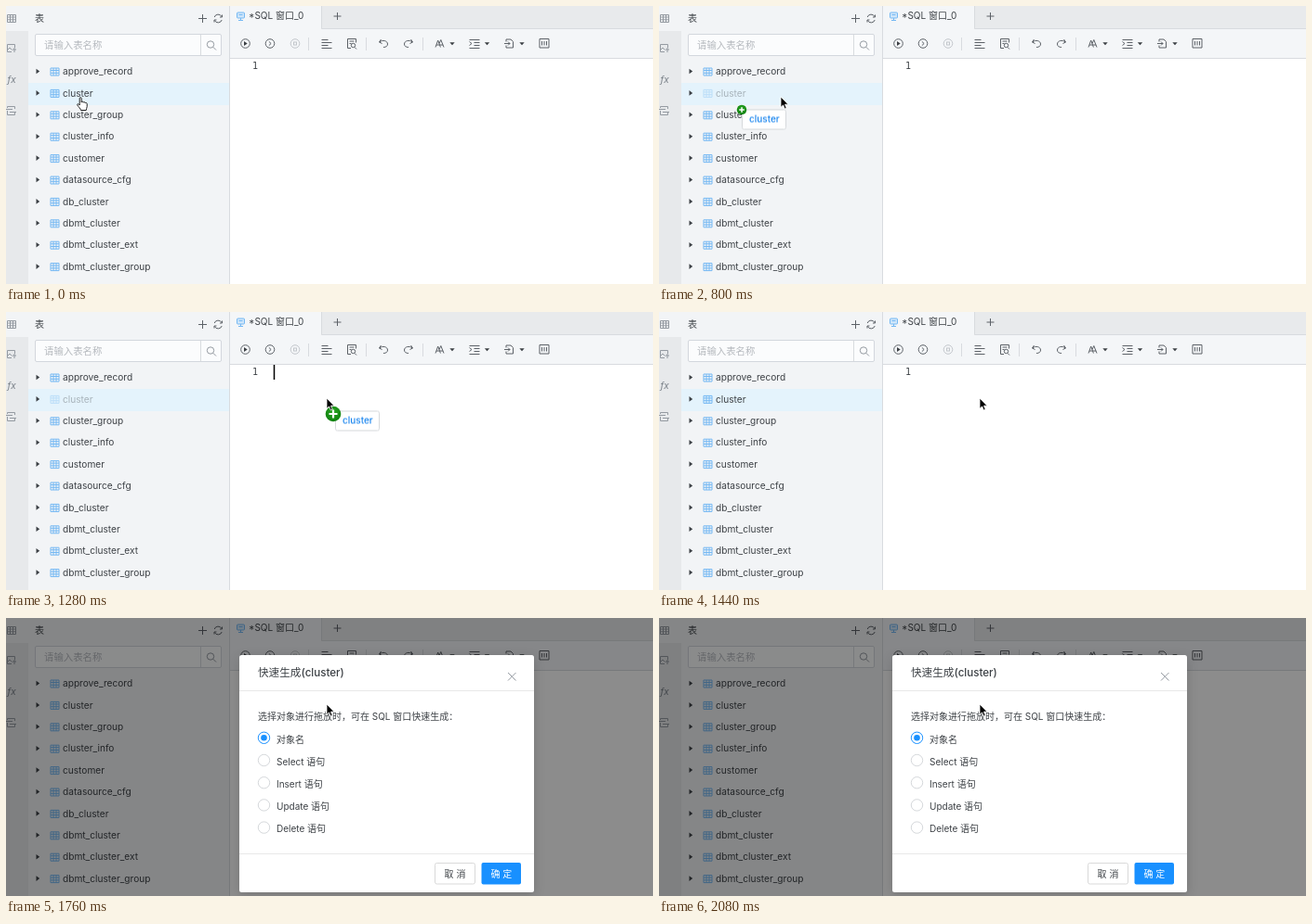
These frames come from a looping animation (696x300 px, 3200 ms). An HTML page:

```html
<!DOCTYPE html>
<html lang="zh-CN">
<head>
<meta charset="utf-8">
<title>SQL</title>
<style>
  html, body { margin: 0; width: 100%; height: 100%; overflow: hidden; background: #fff; }
  svg { display: block; }
  text { font: 10px Inter, "Noto Sans CJK SC", "Noto Sans CJK", sans-serif; fill: #3c4045; white-space: pre; }
  .icon { fill: none; stroke: #5c6167; stroke-width: 1; }
  .muted { stroke: #949aa1; }
  .pale { stroke: #c3c7cc; }
  .blue { stroke: #74b8f3; }
  .solid { fill: #3c4045; stroke: none; }
  .rule { fill: none; stroke: #d8dbdf; stroke-width: 1; }
  #rows text { font-size: 10.15px; }
  #modal { transform-origin: 409px 168px; }
  #modal .panel { filter: drop-shadow(0 3px 6px rgba(0, 0, 0, .15)); }
</style>
</head>
<body>
<svg id="stage" width="696" height="300" viewBox="0 0 696 300">
  <defs>
    <radialGradient id="green" cx=".5" cy=".35" r=".65">
      <stop offset="0" stop-color="#2aa522"/>
      <stop offset="1" stop-color="#0f800f"/>
    </radialGradient>
    <path id="table" d="M.5 .5h9v8h-9zM.5 3h9M.5 5.800h9M3.500 .5v8M6.500 .5v8"/>
    <path id="down" d="M-2.700 -1.300h5.400L0 1.700z"/>
  </defs>

  <!-- Side strip and table list -->
  <rect width="24" height="300" fill="#e7e9eb"/>
  <rect x="24" width="217" height="300" fill="#f2f4f6"/>
  <rect width="24" height="27" fill="#f2f4f6"/>
  <path class="rule" d="M240.500 0V300"/>
  <use href="#table" class="icon muted" x="1" y="9"/>
  <path class="icon muted" d="M9.500 45V41.500H1.500V49.500H6M1.500 47.500L4 45L6.500 47.500M7 47h4M9 45v5"/>
  <text x="1.500" y="82.500" style="font-style:italic;fill:#777e86">fx</text>
  <path class="icon muted" d="M1.500 110V108.500H9.500V111M1.500 113V117.500H9.500V115M0 111.500H7M4 114.500H11"/>

  <text x="31" y="17" style="font-weight:500">表</text>
  <path class="icon" d="M207 13.500h9M211.500 9v9"/>
  <path class="icon" d="M224.200 12A4.200 4.200 0 0 1 232 11.500M232.200 15A4.200 4.200 0 0 1 224.400 15.500M230 12h2.500V9.500M226.500 15h-2.500v2.500"/>
  <rect x="31.500" y="30.500" width="200" height="23" rx="1.500" fill="#fbfcfd" stroke="#d3d7dd"/>
  <path class="rule" d="M209.500 31v22"/>
  <text x="41" y="46" style="font-size:10.400px;fill:#b5b9be">请输入表名称</text>
  <g class="icon muted"><circle cx="220" cy="41.500" r="3.700"/><path d="M222.700 44.200l3.300 3.300"/></g>
  <rect id="hover" x="24" y="83" width="216" height="24" fill="#e4f3fc"/>
  <g id="rows"></g>

  <!-- Tabs -->
  <rect x="241" width="455" height="25" fill="#e8eaec"/>
  <rect x="241" width="98" height="25" fill="#f4f6f8"/>
  <path class="rule" d="M339.500 0V24.500H696"/>
  <g class="icon blue"><rect x="248.500" y="7" width="8" height="6" rx="1" fill="#cfe6fa"/><path d="M250 15.500h5M252.500 13v2.500M250.500 9.500h4"/></g>
  <text x="261" y="14">*SQL 窗口_0</text>
  <path class="icon" d="M352.500 11h8M356.500 7v8"/>

  <!-- Toolbar -->
  <rect x="241" y="25" width="455" height="31" fill="#f4f6f8"/>
  <path class="rule" d="M241 56.500H696M325.500 34V48M387.500 34V48M448.500 34V48"/>
  <g transform="translate(0 -.5)">
    <g class="icon">
      <circle cx="257.500" cy="41" r="4.800"/><path class="solid" d="M256 38.600v4.800l3.700 -2.400z"/>
      <circle cx="284" cy="41" r="4.800"/><path d="M282.800 38.800l2.300 2.200l-2.300 2.200"/>
      <g class="pale"><circle cx="311" cy="41" r="4.800"/><rect x="309.500" y="39.500" width="3" height="3"/></g>
      <path d="M339.500 37h7M339.500 40h11M339.500 43h7M339.500 46h11"/>
      <path d="M371 46H367.500V36H376.500V40M369.500 38.500h5M369.500 41h2M375 45l2 2"/><circle cx="373.500" cy="43" r="2.200"/>
      <path d="M403.500 36.500L401.500 39.500L404.500 41M401.800 39.500C405 36.500 410.500 38 410.500 41.500C410.500 44 408.500 45 406 45"/>
      <path d="M435.500 36.500L437.500 39.500L434.500 41M437.200 39.500C434 36.500 428.500 38 428.500 41.500C428.500 44 430.500 45 433 45"/>
      <path d="M462 45l2.700 -7.500l2.700 7.500M463 42.500h3.500M466 41l1.800 -4l3.200 8M466.800 42.500h3.300"/>
      <path d="M498.500 37h11M503.500 40h6M503.500 43h6M498.500 46h11M498.500 39l2.500 2l-2.500 2"/>
      <path d="M538 39V36.500H543L545.500 39V45.500H538V43M536 41h6M540 39l2 2l-2 2"/>
      <path d="M574 36h10v9.500h-10zM576.500 38.500v4.500M579 38.500v4.500M581.500 38.500v4.500"/>
    </g>
    <g class="solid"><use href="#down" x="480" y="41"/><use href="#down" x="517.500" y="41"/><use href="#down" x="555" y="41"/></g>
  </g>

  <!-- Editor -->
  <text x="265" y="68" style="font:10px 'DejaVu Sans Mono', monospace">1</text>
  <path id="caret" d="M288.500 57v16" stroke="#000" stroke-width="1.500"/>

  <rect id="mask" width="696" height="300"/>

  <g id="modal">
    <rect class="panel" x="251" y="40" width="317" height="256" rx="2.500" fill="#fff"/>
    <path d="M251 78.500H568M251 254.500H568" stroke="#e8e8e8"/>
    <text x="271" y="63" style="font-size:11.600px;font-weight:500">快速生成(cluster)</text>
    <path class="icon muted" d="M540 59l8.500 8.500M548.500 59l-8.500 8.500"/>
    <text x="271" y="110">选择对象进行拖放时，可在 SQL 窗口快速生成：</text>
    <g id="options"></g>
    <rect x="461.500" y="264.500" width="43" height="22.500" rx="2" fill="#fff" stroke="#d9d9d9"/>
    <text x="483" y="279.500" text-anchor="middle">取 消</text>
    <rect x="511.500" y="264" width="42.500" height="23.500" rx="2" fill="#1890ff"/>
    <text x="532.800" y="279.500" text-anchor="middle" style="fill:#fff">确 定</text>
  </g>

  <!-- Dragged chip and pointers -->
  <g id="chip">
    <rect x=".5" y=".5" width="47" height="21" rx="2" fill="#fff" stroke="#d6d9dc"/>
    <text x="8" y="14.300" style="fill:#1583ee;font-weight:500">cluster</text>
  </g>
  <g id="badge">
    <circle r="8.300" fill="url(#green)"/>
    <path d="M-4.500 0h9M0 -4.500v9" stroke="#fff" stroke-width="2.200"/>
  </g>
  <path id="hand" transform="translate(76 98)" fill="#fff" stroke="#222" stroke-width="1" stroke-linejoin="round"
    d="M3.200 9V1.800C3.200 .2 5.200 .2 5.200 1.800V6C5.200 4.800 7.200 4.800 7.200 6.200C7.400 5.200 9.200 5.400 9.200 6.800C9.500 6 11.200 6.200 11.200 7.700V10.500C11.200 12 10.200 12.800 10.200 14.500H4.500C4.200 12.500 2.500 11.500 .8 9C.2 7.500 1.800 7 3.200 9z"/>
  <path id="arrow" fill="#000" stroke="#fff" stroke-width=".8" stroke-linejoin="round"
    d="M0 0V11.300L2.600 8.900L4.300 13L6.200 12.200L4.500 8.200H8z"/>
</svg>
<script>
const LOOP = 3200;
const $ = id => document.getElementById(id);

const tables = ['approve_record', 'cluster', 'cluster_group', 'cluster_info', 'customer',
  'datasource_cfg', 'db_cluster', 'dbmt_cluster', 'dbmt_cluster_ext', 'dbmt_cluster_group'];
$('rows').innerHTML = tables.map((name, i) => `
  <g transform="translate(0 ${(70.5 + 23.4 * i).toFixed(1)})">
    <path class="solid" d="M32.500 -2.800v5.600l3.700 -2.800z"/>
    <g id="row${i}"><use href="#table" class="icon blue" x="47.500" y="-4"/><text x="61" y="3.600">${name}</text></g>
  </g>`).join('');

const options = ['对象名', 'Select 语句', 'Insert 语句', 'Update 语句', 'Delete 语句'];
$('options').innerHTML = options.map((label, i) => `
  <g transform="translate(277.500 ${129.3 + 24.2 * i})">
    <circle r="6.200" fill="#fff" stroke="${i ? '#d5d8db' : '#1890ff'}"/>
    ${i ? '' : '<circle r="3.300" fill="#1890ff"/>'}
    <text x="13.500" y="5.200">${label}</text>
  </g>`).join('');

// Each step is [start in ms, properties], held until the next one.
function play(id, steps) {
  const frames = steps.map(([ms, props]) => ({ offset: ms / LOOP, easing: 'step-end', ...props }));
  frames.push({ ...frames.at(-1), offset: 1 });
  $(id).animate(frames, { duration: LOOP, iterations: Infinity });
}
const fade = (id, ...steps) => play(id, steps.map(([ms, opacity]) => [ms, { opacity }]));
const at = (x, y, scale = 1, opacity = 1) =>
  ({ transform: `translate(${x}px, ${y}px) scale(${scale})`, opacity });
const hidden = at(0, 0, 1, 0);

fade('hand', [0, 1], [800, 0]);
fade('row1', [0, 1], [800, .36], [1440, 1]);
fade('hover', [0, 1], [1600, 0]);
fade('caret', [0, 0], [960, 1], [1440, 0]);
fade('mask', [0, 0], [1600, .3], [1760, .45]);
play('arrow', [[0, hidden], [800, at(131, 98)], [960, at(289, 99)], [1120, at(345, 93)]]);
play('chip', [[0, hidden], [800, at(89, 111.5)], [960, at(298, 112.5)], [1120, at(353.5, 106.5)],
  [1280, at(354, 106.5)], [1440, hidden]]);
play('badge', [[0, hidden], [800, at(89, 112, .64)], [960, at(296, 116)], [1120, at(352, 110)], [1440, hidden]]);
play('modal', [[0, { opacity: 0, transform: 'scale(.965)' }],
  [1600, { opacity: .93, transform: 'scale(.965)' }], [1760, { opacity: 1, transform: 'scale(1)' }]]);
</script>
</body>
</html>
```
